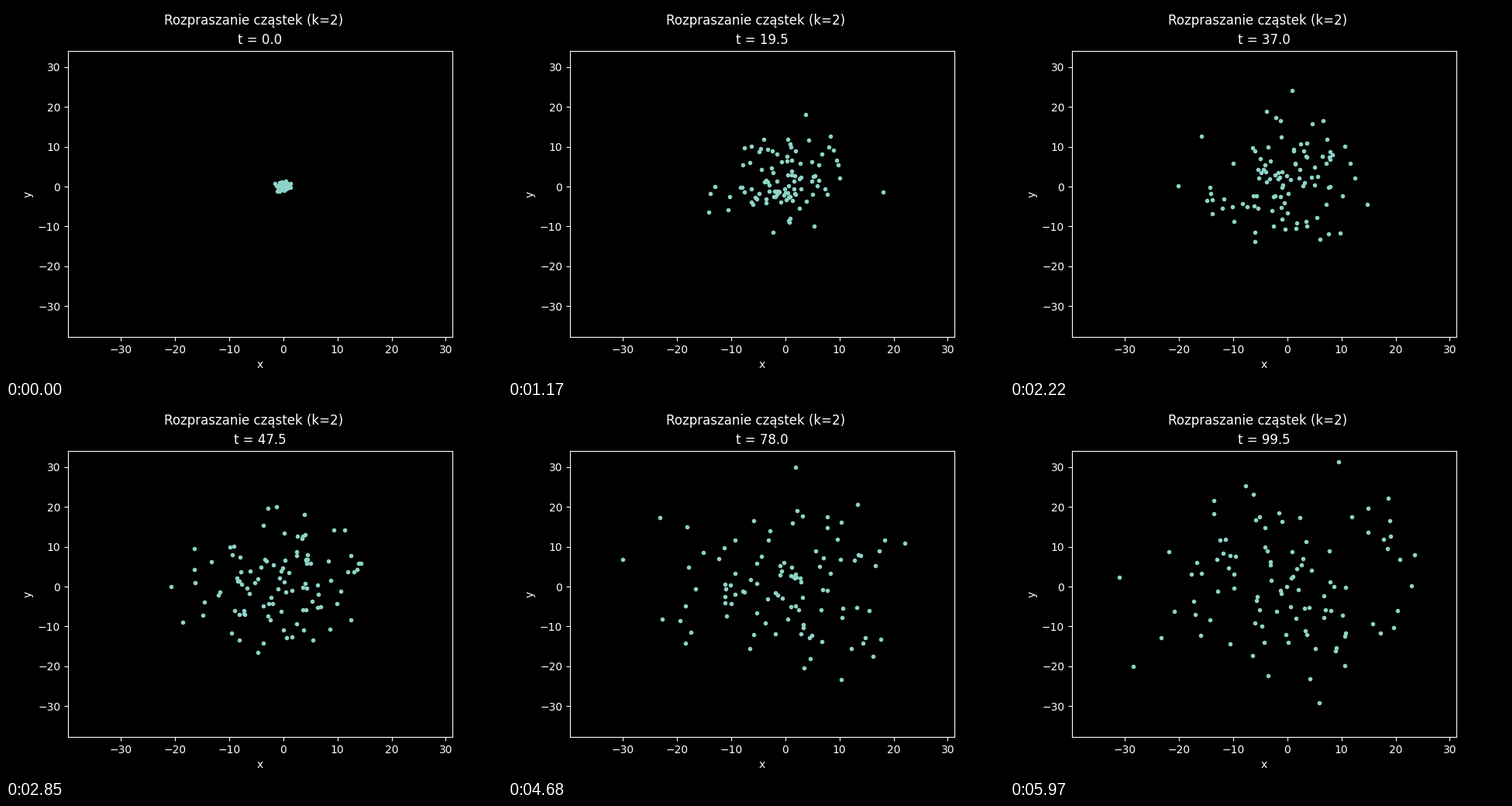
These frames come from a looping animation (640x480 px, 6 s). A matplotlib script:

```python
import numpy as np
import matplotlib.pyplot as plt
from matplotlib.animation import FuncAnimation

FRAMES = 200
DT = 0.5
COUNT = 100
START = 0.5   # spread of the first cloud
STEP = 0.88   # spread of each random step
XLIM = (-39.75, 31.23)
YLIM = (-37.75, 34.1)


def scatter_paths(seed):
    """Random walks from a small cloud that stay inside the axes."""
    rng = np.random.default_rng(seed)
    steps = rng.normal(0, STEP, (2 * COUNT, FRAMES, 2))
    steps[:, 0] *= START / STEP
    paths = steps.cumsum(axis=1)
    low, high = np.transpose([XLIM, YLIM])
    inside = np.all((paths > low + 0.5) & (paths < high - 0.5), axis=(1, 2))
    return paths[inside][:COUNT]


paths = scatter_paths(2)

plt.style.use("dark_background")
fig, ax = plt.subplots(figsize=(6.4, 4.8), dpi=100)
fig.suptitle("Rozpraszanie cząstek (k=2)")
ax.set(xlim=XLIM, ylim=YLIM, xlabel="x", ylabel="y")
dots, = ax.plot([], [], ".")
title = ax.set_title("t = 0.0")


def update(i):
    dots.set_data(paths[:, i, 0], paths[:, i, 1])
    title.set_text(f"t = {i * DT:.1f}")
    return dots, title


anim = FuncAnimation(fig, update, frames=FRAMES, interval=30, repeat=True)
plt.show()
```
